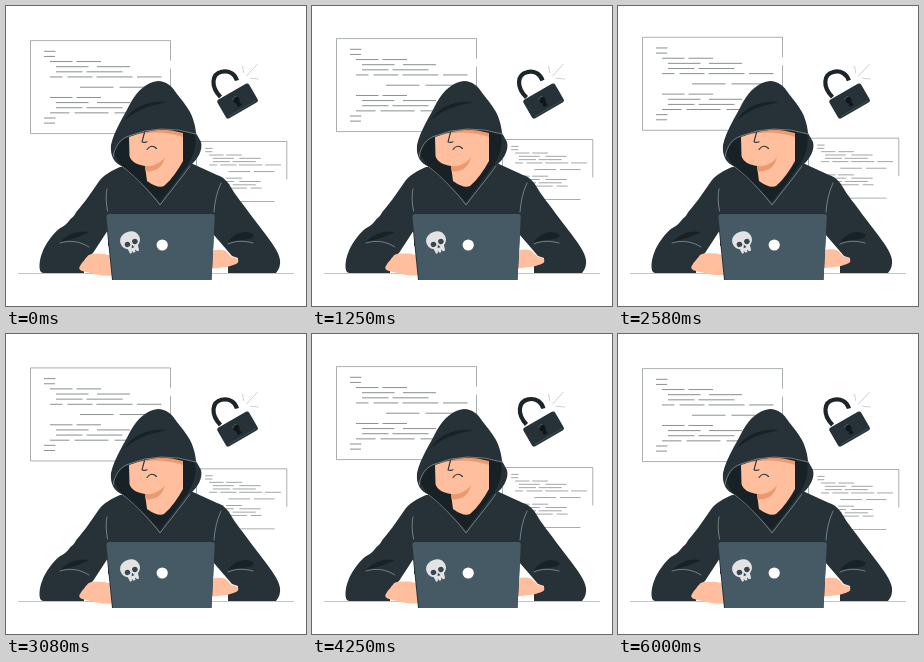
Recreate the animation shown at these times as an HTML page. Size 300 px wide and 300 px high, loop 6040 ms.

```html
<!DOCTYPE html>
<html lang="en">
<head>
<meta charset="utf-8">
<title>Hooded figure at a laptop</title>
<style>
  html, body { margin: 0; width: 100%; height: 100%; overflow: hidden; background: #fff; }
  svg { display: block; width: 100vw; height: 100vh; }
  .dark { fill: #263238; }
  .deep { fill: #182125; }
  .skin { fill: #ffbe9d; }
  .shade { fill: #eb996e; }
  .seam { fill: none; stroke: #a9b1b4; stroke-width: .6; stroke-linecap: round; }
  .ink { fill: none; stroke: #263238; stroke-width: 1.1; stroke-linecap: round; stroke-linejoin: round; }
  .frame { fill: none; stroke: #6f797d; }
  .code { fill: none; stroke: #566064; }
</style>
</head>
<body>
<svg viewBox="0 0 300 300" xmlns="http://www.w3.org/2000/svg">
  <g id="panels"></g>

  <g>
    <path id="shackle" d="M214.5 91C204 80 206 68 215.5 65.8C223 64 229 68 231 74.5" fill="none" stroke="#1c2529" stroke-width="4.2"/>
    <g transform="rotate(-30 231.5 95)">
      <rect class="dark" x="213.3" y="84.3" width="36.5" height="21.5" rx="2.5"/>
      <path d="M216 104H248" stroke="#455a64" stroke-width=".6"/>
      <circle cx="231" cy="93.5" r="3.2" fill="#10171a"/>
      <path d="M229.8 94H232.2L233.4 100.5H228.6Z" fill="#10171a"/>
      <path d="M228 92A3.6 3.6 0 0 1 233 90.5" fill="none" stroke="#607078" stroke-width=".7"/>
    </g>
    <path class="seam" d="M236.6 60L237.6 66.5M240.5 70L251.5 58M244.5 72.2L252.5 73"/>
  </g>

  <path d="M12 267.5H288" stroke="#a6adb0" stroke-width=".7"/>

  <!-- body and sleeves -->
  <path class="dark" d="M114 161C105 165 98 169 94 174C87 184 79 196 72 204C69 207 69 210 65 212.5
    C62 216 60 219 57 220.5C51 223 45 231 41 237C36 245 34 252 33.5 259Q33 266 37 267H78L79 253L87 247L102 224V240
    H207V228L220 243L226 250L232 252V256L222 260V267H270Q275 261 274 254C273 246 266 237 257 225
    L244 208C237 198 230 190 226 183C221 174 217 171 211 169L187 158Z"/>
  <path class="deep" d="M54 236C62 228 72 224 83 226C75 230 67 233 54 236Z"/>
  <path class="deep" d="M222 236C229 226 240 223 248 229C246 235 234 233 222 236Z"/>
  <path class="seam" d="M54 237C63 234 74 235 83 241M101 183Q99 192 101.5 205M215 177Q209 190 208 206M222 238C231 234 239 235 247 237"/>

  <!-- hood -->
  <path class="dark" d="M152 75C141 76 132 84 125 96C118 110 108 125 105 139C104 150 108 157 117 161
    C127 171 142 184 154 199C165 185 176 173 184 160C192 153 197 144 195 136L190 127C189 118 187 112 184 106
    C180 99 175 93 171 88C166 80 160 75 152 75Z"/>
  <path class="deep" d="M108 146C111 137 117 132 124 130Q155 117 189 128C191 141 187 150 183 157
    L168 178L154 196L139 181C125 169 112 160 108 146Z"/>
  <path class="skin" d="M123 131Q150 120 177 129V155C172 164 166 173 158 180Q152 183 141 175L139 160
    C132 159 125 156 123.5 150Z"/>
  <path class="shade" d="M139 160C147 161 155 157 159 151C157 161 149 167 139.5 165Z"/>
  <path class="shade" d="M127 129Q152 119 177 127V131Q155 123 127 129Z"/>
  <path class="dark" d="M116 133C126 119 170 115 190 127C173 121 145 122 116 133Z"/>
  <path class="deep" d="M119 114C126 101 143 94 161 96C148 99 133 102 119 114Z"/>
  <path class="seam" d="M107 151C109 140 114 133 123 130Q154 117 190 128M117 161C132 173 145 187 154 199C163 187 174 174 184 160"/>
  <path class="ink" d="M138.5 126.5L136 135.8Q138 137 141 135.8M141 143.5Q145.5 137.5 150.5 142.5"/>

  <g id="hands">
    <path class="skin" d="M74 260C76 256 79 254 82 249.5C87 247 93 248 99 248L106 250V269.5C97 270.5 88 268 80 266C74 265 72 263 74 260Z"/>
    <path class="skin" d="M206 244.5C211 243.5 216 243.5 220 245C223 248 224 250.5 227 251.5C232 251.5 233 254 232 256.5C229 260 216 262 206 262.5Z"/>
  </g>

  <!-- laptop -->
  <path class="dark" d="M102 208H206Q209 208 208.8 211L205.5 274H106L99.7 212Q99 208 102 208Z"/>
  <path d="M103 208H206Q209 208 208.8 211L205.5 274H107L100.5 212Q100 208 103 208Z" fill="#455a64"/>
  <circle cx="156.2" cy="239" r="5.6" fill="#fff"/>
  <g transform="rotate(-22 125 236.5)">
    <path d="M125 225.5C118 225.5 114.5 230 115 235C115.3 238.5 117 240.5 119.5 241.5L120 246.5H122L122.5 244.5L123.5 247H125.5L126 244.5L127.5 247H129.5L130.5 241.5C133.5 240 135 237 135 234C134.5 229 131 225.5 125 225.5Z" fill="#e3e3e3"/>
    <ellipse cx="121" cy="237" rx="2.8" ry="2.6" fill="#37474f"/>
    <ellipse cx="129" cy="237" rx="2.8" ry="2.6" fill="#37474f"/>
    <path d="M125 239L126.5 242H123.5Z" fill="#37474f"/>
  </g>
</svg>
<script>
  const LOOP = 6040, FPS = 24, FLOAT = 1.5, WOBBLE = 6;
  const $ = id => document.getElementById(id);

  // Each row: line number, then start and end of its dashes.
  const opening = [[0, 13.5, 25], [1, 13.5, 24.5]];
  const block = [
    [2, 19.5, 42, 46, 70.5],
    [3, 25.5, 58, 66.5, 99.5],
    [4, 25.5, 52, 56, 92]
  ];
  const shift = (rows, by) => rows.map(([n, ...x]) => [n + by, ...x]);
  const rows = [
    ...opening, ...block,
    [5, 19.5, 32, 37, 62, 66, 102, 106.5, 131],
    [7, 49.5, 83, 89, 121],
    ...shift(block, 7),
    [12, 19.5, 39, 44, 78, 84, 101],
    ...shift(opening, 13)
  ];

  const codePath = rows.map(([n, ...x]) =>
    x.map((v, i) => `${i % 2 ? 'L' : 'M'}${v} ${10.7 + n * 5.13}`).join('')).join('');

  const panel = (x, y, scale, frame) => `
    <g transform="translate(${x} ${y}) scale(${scale})">
      <path class="frame" d="${frame}" stroke-width="${.6 / scale}"/>
      <path class="code" d="${codePath}" stroke-width="${.7 / Math.sqrt(scale)}"/>
    </g>`;

  $('panels').innerHTML =
    panel(24.5, 34.6, 1, 'M140 28V93H0V0H140V20') +
    panel(190.5, 135.5, .645, 'M121 93H0V0H140V59');

  const triangle = p => 1 - Math.abs(1 - 2 * (p % 1));
  const sway = p => 2 * triangle(p + .25) - 1;

  function draw(ms) {
    const s = Math.floor((ms % LOOP + 5) * FPS / 1000) / FPS;
    const lift = triangle(s / FLOAT);
    $('panels').setAttribute('transform', `translate(0 ${-6 * lift})`);
    $('hands').setAttribute('transform', `translate(0 ${-.8 * lift})`);
    $('shackle').setAttribute('transform', `rotate(${-2 * sway(s / WOBBLE)} 231 90)`);
  }

  const start = performance.now();
  function tick() {
    draw(performance.now() - start);
    requestAnimationFrame(tick);
  }
  tick();
</script>
</body>
</html>
```
